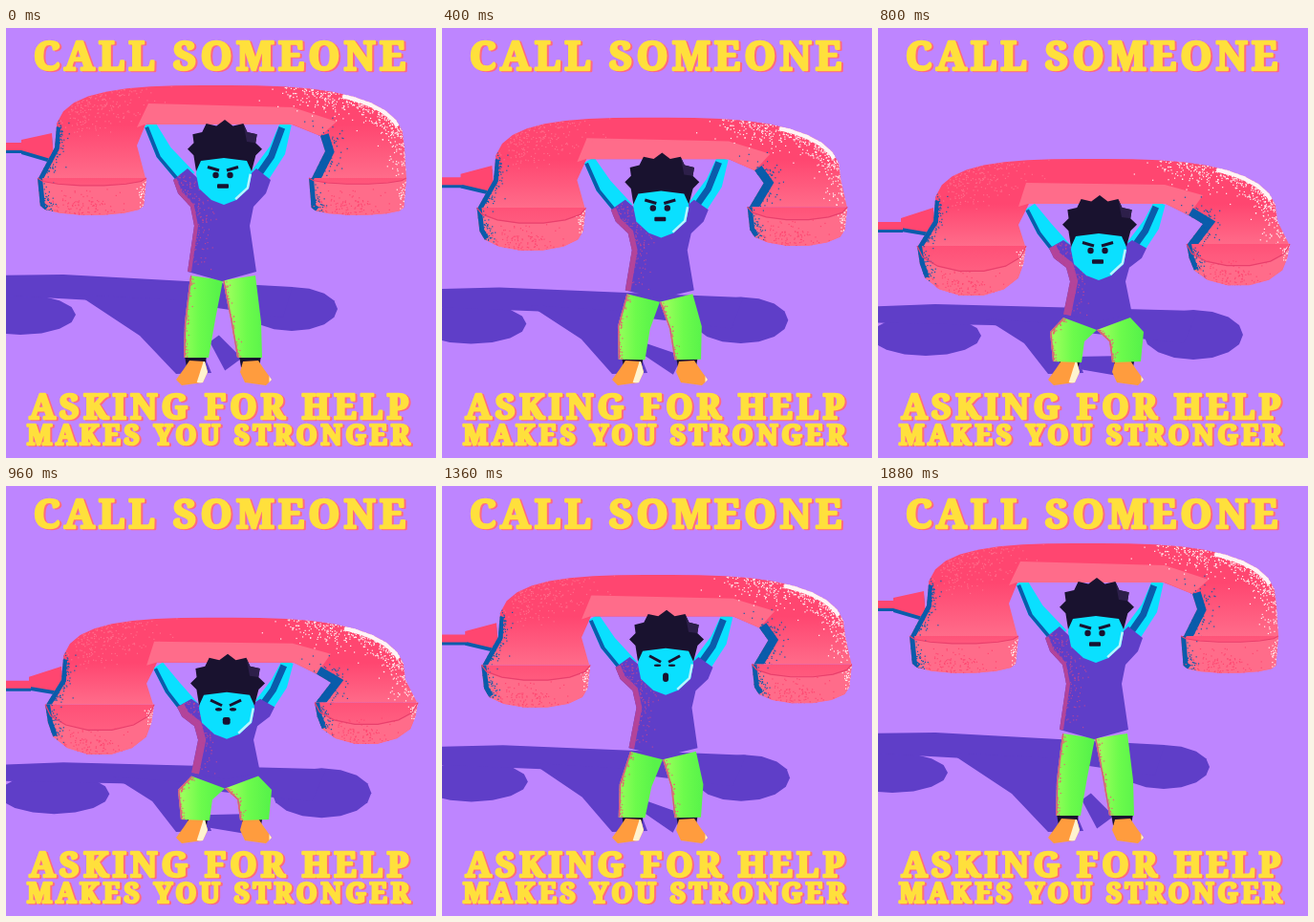
These frames come from a looping animation (450x450 px, 1.92 s). An HTML page with a canvas:

```html
<!DOCTYPE html>
<html lang="en">
<head>
<meta charset="utf-8">
<title>Call someone</title>
<style>
html, body { margin: 0; width: 100%; height: 100%; overflow: hidden; background: #be85ff; }
canvas, svg { position: absolute; left: 0; top: 0; width: 450px; height: 450px; }
text {
  font-family: "Noto Serif", serif; font-weight: 900; text-anchor: middle;
  fill: #ffe03c; stroke: #ffe03c; stroke-width: 2.6; stroke-linejoin: round;
  filter: drop-shadow(2.2px 1.6px 0 #ff6a80);
}
#top { font-size: 42px; letter-spacing: 4.1px; animation: nudge 440ms step-end infinite; }
#ask { font-size: 36px; letter-spacing: 4.1px; }
#make { font-size: 28px; letter-spacing: 3.8px; }
@keyframes nudge {
  46% { transform: translateX(-1.8px); }
  64% { transform: none; }
}
</style>
</head>
<body>
<canvas id="stage" width="450" height="450"></canvas>
<svg viewBox="0 0 450 450">
  <text id="top" x="225.5" y="43.5">CALL SOMEONE</text>
  <text id="ask" x="225" y="408.5">ASKING FOR HELP</text>
  <text id="make" x="224" y="436">MAKES YOU STRONGER</text>
</svg>
<script>
const LOOP = 1920, STEP = 40;
const BACK = '#be85ff', VIOLET = '#5f3ec8', MAGENTA = '#b3449a', PINK = '#ff4670', ROSE = '#ff6c8a',
  BLUE = '#0a5cab', CYAN = '#0ae0ff', INK = '#19122f', ORANGE = '#ff9c3e', WHITE = '#fff4f6';
const ctx = document.getElementById('stage').getContext('2d');
let squat = 0, sway = 0, strain = 0;

const clamp = u => Math.min(1, Math.max(0, u));
const ease = u => (1 - Math.cos(Math.PI * clamp(u))) / 2;
const mix = (a, b) => a + (b - a) * squat;
const at = (x, y, X, Y) => [mix(x, X), mix(y, Y)];

// The body leans over the feet, which stay in place.
const lean = ([x, y]) => [x + sway * clamp((345 - y) / 90), y];

function trace(points, close = true) {
  ctx.beginPath();
  points.forEach(p => ctx.lineTo(...lean(p)));
  if (close) ctx.closePath();
}
function fill(color, points) {
  trace(points);
  ctx.fillStyle = color;
  ctx.fill();
}
function stroke(color, width, points) {
  trace(points, false);
  ctx.strokeStyle = color;
  ctx.lineWidth = width;
  ctx.stroke();
}
function inside(points, paint) {
  ctx.save();
  trace(points);
  ctx.clip();
  paint();
  ctx.restore();
}
function fade(x0, y0, x1, y1, ...colors) {
  const g = ctx.createLinearGradient(x0, y0, x1, y1);
  colors.forEach((c, i) => g.addColorStop(i / (colors.length - 1), c));
  return g;
}
function seeded(seed) {
  return () => (seed = (seed * 16807) % 2147483647) / 2147483647;
}
function grain(color, count, spread, points) {
  const rnd = seeded(count * 31 + spread), p = points.map(lean);
  const off = () => (rnd() + rnd() + rnd() - 1.5) * spread;
  ctx.fillStyle = color;
  for (let n = 0; n < count; n++) {
    const u = rnd() * (p.length - 1), i = Math.floor(u), f = u - i;
    ctx.fillRect(p[i][0] + (p[i + 1][0] - p[i][0]) * f + off(),
                 p[i][1] + (p[i + 1][1] - p[i][1]) * f + off(), 1.2, 1.2);
  }
}
function arc(cx, cy, rx, ry, from, to, steps) {
  return Array.from({ length: steps + 1 }, (_, i) => {
    const a = from + (to - from) * i / steps;
    return [cx + rx * Math.cos(a), cy + ry * Math.sin(a)];
  });
}
const oval = (cx, cy, rx, ry) => arc(cx, cy, rx, ry, 0, 2 * Math.PI, 16);

// Place a half profile at (x, y); side -1 mirrors it.
const place = (x, y, side, half, sy = 1) => half.map(([dx, dy]) => [x + side * dx, y + dy * sy]);
const both = (x, y, half, sy) =>
  [...place(x, y, 1, half, sy), ...place(x, y, -1, half, sy).reverse()];

// Tapered limb through joints [x, y, half width].
function limb(joints) {
  const left = [], right = [];
  joints.forEach(([x, y, w], i) => {
    const a = joints[Math.max(0, i - 1)], b = joints[Math.min(joints.length - 1, i + 1)];
    const d = Math.hypot(b[0] - a[0], b[1] - a[1]);
    const nx = (b[1] - a[1]) / d * w, ny = (a[0] - b[0]) / d * w;
    left.push([x + nx, y + ny]);
    right.unshift([x - nx, y - ny]);
  });
  return [...left, ...right];
}

function groundShadow() {
  fill(VIOLET, oval(...at(15, 300, 50, 322), 58, 21));
  fill(VIOLET, oval(...at(299, 294, 330, 321), mix(48, 52), mix(23, 26)));
  fill(VIOLET, [at(-20, 259, -20, 292), at(60, 258, 60, 289), at(300, 271, 335, 296),
    at(290, 303, 320, 330), at(200, 290, 200, 317), at(110, 286, 120, 311), at(-20, 279, -20, 308)]);
  fill(VIOLET, [at(75, 279, 112, 304), at(140, 322, 153, 330), [178, 362], [215, 361],
    at(200, 325, 205, 335), at(190, 285, 195, 310)]);
  fill(VIOLET, limb([[...at(218, 325, 205, 350), 6], [...at(238, 352, 258, 354), 11]]));
}

function cord() {
  const plug = dy => [at(16, 117 + dy, 24, 199 + dy), at(48, 110 + dy, 58, 188 + dy),
    at(50, 138 + dy, 60, 215 + dy), at(16, 128 + dy, 24, 209 + dy)];
  const y = mix(124, 207);
  stroke(BLUE, 8, [[-20, y + 3], [mix(18, 26), y + 3]]);
  fill(BLUE, plug(4));
  stroke(PINK, 8, [[-20, y], [mix(18, 26), y]]);
  fill(PINK, plug(0));
}

function arms() {
  const left = [[...at(150, 100, 159, 187), 6], [...at(165, 130, 174, 210), 9], [...at(190, 158, 194, 234), 10]];
  const right = [[...at(293, 100, 295, 183), 6], [...at(284, 128, 286, 206), 9], [...at(264, 157, 269, 230), 10]];
  for (const arm of [left, right]) {
    const shape = limb(arm);
    fill(CYAN, shape);
    inside(shape, () => stroke(BLUE, 7, arm.map(([x, y, w]) => [x - w * .7, y + w * .7])));
  }
}

function legs() {
  const half = [at(0, 264, 0, 316), at(8, 305, 13, 328), at(15, 345, 16, 350), at(41, 345, 46, 349),
    at(40, 308, 49, 318), at(34, 259, 35, 303)];
  const foot = [[20, 349], [36, 348], [42, 357], [50, 368], [44, 374], [22, 371], [17, 360]];
  const axis = mix(227, 229);
  for (const side of [-1, 1]) {
    const shoe = place(228, 0, side, foot), leg = place(axis, 0, side, half);
    fill(INK, place(axis, 0, side, [[17, 343], [40, 343], [38, 355], [19, 355]]));
    fill(ORANGE, shoe);
    inside(shoe, () => stroke('#fff3cf', 9, [[side < 0 ? 212 : 280, 347], [side < 0 ? 204 : 280, 372]]));
    const x = axis + side * 25;
    fill(fade(x - 20, 0, x + 20, 0, '#9cff5c', '#6cfb4c', '#58f34a'), leg);
    inside(leg, () => {
      const edge = side < 0 ? leg.slice(3) : leg.slice(0, 3);
      stroke('#d8508a', 3, edge);
      grain('#e06a70', 130, 5, edge);
    });
  }
}

function shirt() {
  const x = mix(226, 230), y = mix(147, 222), sy = mix(1, .72);
  const half = [[0, 35], [36, 0], [51, 12], [46, 26], [33, 40], [29, 60], [36, 108], [0, 118]];
  const shape = both(x, y, half, sy);
  const edge = place(x, y, -1, half.slice(2, 7), sy);
  fill(VIOLET, shape);
  inside(shape, () => {
    stroke(MAGENTA, mix(8, 16), edge);
    grain(MAGENTA, 380, 24, edge);
  });
}

// Upper edge of the handset: a rounded arch, softer on the right.
function arch(from, to, steps = 20) {
  const cx = mix(234, 238), rx = mix(183, 180), top = mix(60, 137), h = 65;
  return Array.from({ length: steps + 1 }, (_, i) => {
    const u = Math.sin((from + (to - from) * i / steps) * Math.PI / 2), n = u < 0 ? 3.4 : 2.6;
    return [cx + rx * u, top + h - h * (1 - Math.abs(u) ** n) ** (1 / n)];
  });
}

function cup(cx, w, rim, side, ry) {
  const low = arc(cx, side, w * .95, ry, Math.PI, 0, 7);
  const lip = arc(cx, rim, w, ry * .8, Math.PI, 0, 7);
  const shape = [[cx - w, rim], ...low, [cx + w, rim]];
  fill(fade(0, rim - 20, 0, side + ry, PINK, ROSE), shape);
  inside(shape, () => {
    fill(ROSE, [...lip, ...low.slice().reverse()]);
    stroke(BLUE, 10, [[cx - w, rim], low[0], low[1]]);
    grain(BLUE, 110, 13, [[cx - w, rim], low[0], low[1]]);
    grain(PINK, 200, 26, low.slice(2, 5));
    grain(WHITE, 80, 8, [[cx + w, rim], low[7]]);
  });
  stroke('#e93f6c', 1.2, lip);
}

function handset() {
  const top = mix(60, 137), under = top + mix(41, 47);
  const rimL = mix(157, 228), rimR = mix(157, 226);
  const innerR = [[mix(320, 324), rimR], [mix(334, 340), (rimR + under) / 2], [mix(329, 325), under + 12]];
  const body = [[mix(34, 42), rimL], ...arch(-1, 1), [mix(419, 430), rimR], ...innerR,
    [mix(299, 301), under], [mix(146, 158), under], [mix(137, 147), under + 22], [mix(146, 154), rimL]];
  fill(fade(0, under, 0, rimL, PINK, ROSE), body);
  inside(body, () => {
    const ridge = [[mix(149, 155), top + mix(19, 25)], [300, top + mix(23, 27)], [mix(346, 340), top + 38]];
    fill(ROSE, [...ridge, innerR[2], [300, under], [mix(145, 157), under], [mix(137, 147), under + 3]]);
    grain(ROSE, 420, 34, arch(-.75, -.35));
    const outerL = [...arch(-1, -.85, 4).reverse(), [mix(34, 42), rimL]];
    stroke(BLUE, 10, outerL.slice(2));
    grain(BLUE, 170, 12, outerL.slice(2));
    stroke(BLUE, 18, innerR);
    grain(BLUE, 190, 20, innerR);
    stroke(WHITE, 9, arch(.45, .85));
    grain(WHITE, 900, 20, [...arch(.2, 1), [mix(419, 430), rimR]]);
  });
  cup(mix(90, 98), 57, rimL, mix(186, 247), mix(10, 34));
  cup(mix(368, 377), mix(51, 54), rimR, mix(188, 241), mix(8, 29));
}

function head() {
  const x = mix(228, 231), y = mix(154, 233);
  const face = both(x, y, [[0, -22], [27, -22], [29, -1], [26, 14], [13, 26], [0, 31]]);
  fill(CYAN, face);
  inside(face, () => stroke('#b9f4ff', 5, face.slice(2, 5)));

  const tufts = arc(x + 1, y - 27, 39, 31, Math.PI * .92, Math.PI * 2.08, 14)
    .map(([px, py], i) => i % 2 ? [px, py] : [x + (px - x) * .86, y - 27 + (py - y + 27) * .82]);
  fill(INK, [...tufts, [x + 29, y - 4], [x + 24, y - 15], [x, y - 18], [x - 24, y - 15], [x - 29, y - 4]]);
  fill('#2d1f4a', [...tufts.slice(9, 13), [x + 24, y - 35]]);

  const [fx, fy] = lean([x - 1, y]);
  const drop = strain * 1.5, w = 12 - 6 * strain, h = 4.5 + 5 * strain;
  ctx.strokeStyle = ctx.fillStyle = INK;
  ctx.lineWidth = 3;
  for (const side of [-1, 1]) {
    ctx.beginPath();
    ctx.moveTo(fx + side * 16, fy - 8.5 - drop);
    ctx.lineTo(fx + side * 4, fy - 5 + drop);
    ctx.stroke();
    ctx.beginPath();
    ctx.ellipse(fx + side * 7.5, fy, 3.2 + strain * .5, 3.2 - strain * 2, 0, 0, 7);
    ctx.fill();
  }
  ctx.beginPath();
  ctx.roundRect(fx - w / 2 + strain, fy + 11.5 + strain - h / 2, w, h, 1 + 2 * strain);
  ctx.fill();
}

function draw(now) {
  const t = Math.floor((now % LOOP) / STEP) * STEP;
  squat = 1.02 * (ease(t / 880) - ease((t - 905) / 825));
  sway = 6 * Math.sin(Math.PI * clamp((t - 940) / 940) ** 1.3) ** 2;
  strain = ease((t - 860) / 160) - ease((t - 1640) / 160);
  ctx.fillStyle = BACK;
  ctx.fillRect(0, 0, 450, 450);
  for (const part of [groundShadow, cord, arms, legs, shirt, handset, head]) part();
}

const start = performance.now();
function tick() {
  draw(performance.now() - start);
  requestAnimationFrame(tick);
}
tick();
</script>
</body>
</html>
```
